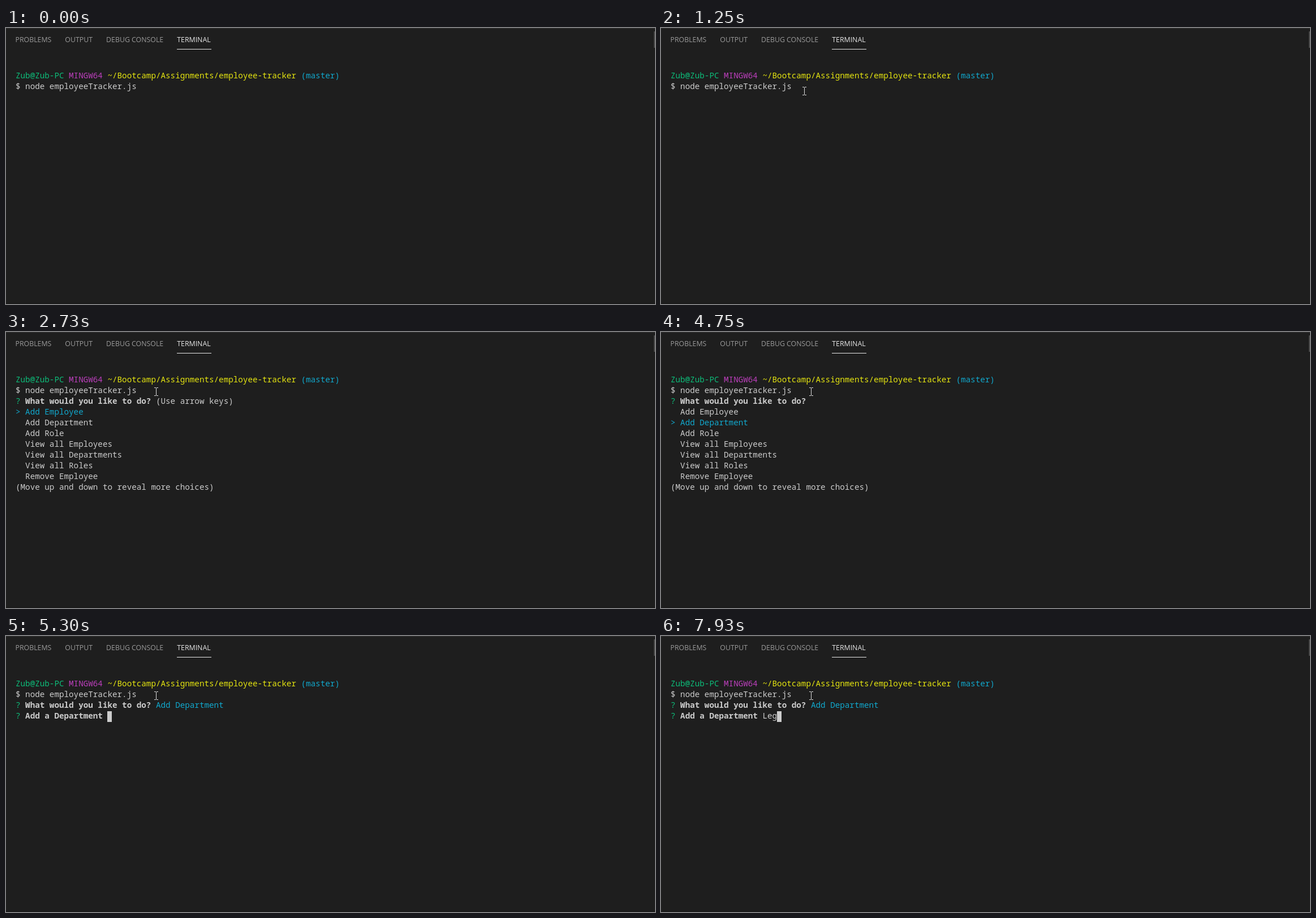
An HTML page with a canvas for the animation above (8000 ms loop, 1147 by 488 pixels).

```html
<!DOCTYPE html>
<html lang="en">
<head>
<meta charset="utf-8">
<title>Employee tracker terminal</title>
<style>
  html, body { margin: 0; width: 100%; height: 100%; overflow: hidden; background: #1e1e1e; }
  canvas { display: block; }
</style>
</head>
<body>
<canvas id="stage" width="1147" height="488"></canvas>
<script>
const ctx = document.getElementById("stage").getContext("2d");
const LOOP = 8000;
const LEFT = 17, BASELINE = 89, ROW = 19, FONT_SIZE = 14.25, COL = FONT_SIZE * 0.6;
const TEXT = "#cccccc", GREEN = "#0dbc79", MAGENTA = "#bc3fbc", YELLOW = "#e5e510", CYAN = "#11a8cd";
const DIM = "#9a9a9a", BRIGHT = "#e7e7e7";

const TABS = ["PROBLEMS", "OUTPUT", "DEBUG CONSOLE", "TERMINAL"];
const CHOICES = ["Add Employee", "Add Department", "Add Role", "View all Employees",
  "View all Departments", "View all Roles", "Remove Employee"];
const ANSWER = "Leg", KEY_TIMES = [7080, 7620, 7930];

// The pointer is sampled every 80 ms while it glides through these moves.
const SAMPLE = 80, SAMPLE_PHASE = 50;
const ENTRY = { time: 70, x: 1011, y: 477 };
const MOVES = [
  { from: 70, to: 450, x: 209, y: 182 },
  { from: 530, to: 770, x: 266, y: 124 },
  { from: 770, to: 1250, x: 253, y: 111 },
  { from: 1330, to: 1410, x: 274, y: 97 },
  { from: 1410, to: 1490, x: 265, y: 105 }
];

const clamp = u => Math.min(1, Math.max(0, u));
const easeOut = u => u * (2 - u);

function rect(x, y, w, h, color) {
  ctx.fillStyle = color;
  ctx.fillRect(x, y, w, h);
}

function write(row, col, text, color = TEXT, weight = 500) {
  ctx.font = `${weight} ${FONT_SIZE}px "Noto Sans Mono", monospace`;
  ctx.fillStyle = color;
  ctx.fillText(text, LEFT + col * COL, BASELINE + row * ROW);
}

function drawPanel() {
  rect(0, 0, 1147, 488, "#1e1e1e");
  rect(0, 0, 1147, 1, "#303030");
  rect(0, 486, 1147, 2, "#1a1a1a");
  rect(1145, 6, 2, 29, "#4b4b4b");
  ctx.font = '12.35px "Open Sans", sans-serif';
  let x = 16.5;
  for (const label of TABS) {
    ctx.fillStyle = label === "TERMINAL" ? BRIGHT : DIM;
    ctx.fillText(label, x, 25);
    x += ctx.measureText(label).width + 24;
  }
  rect(302, 37, 61, 1, BRIGHT);
}

function drawCommand() {
  write(0, 0, "Zub@Zub-PC", GREEN);
  write(0, 11, "MINGW64", MAGENTA);
  write(0, 19, "~/Bootcamp/Assignments/employee-tracker", YELLOW);
  write(0, 59, "(master)", CYAN);
  write(1, 0, "$ node employeeTracker.js");
}

function ask(row, question) {
  write(row, 0, "?", GREEN);
  write(row, 2, question, TEXT, 700);
}

function drawMenu(selected) {
  CHOICES.forEach((choice, i) => {
    const active = i === selected;
    if (active) write(3 + i, 0, ">", CYAN);
    write(3 + i, 2, choice, active ? CYAN : TEXT);
  });
  write(10, 0, "(Move up and down to reveal more choices)");
}

function drawInput(t) {
  const count = KEY_TIMES.filter(time => time <= t).length;
  ask(3, "Add a Department");
  write(3, 19, ANSWER.slice(0, count));
  rect(Math.floor(LEFT + (19 + count) * COL), 133, 8, 19, TEXT);
}

function drawPointer(t) {
  if (t < ENTRY.time) return;
  const sampled = Math.floor((t - SAMPLE_PHASE) / SAMPLE) * SAMPLE + SAMPLE_PHASE;
  let { x, y } = ENTRY;
  for (const move of MOVES) {
    const u = easeOut(clamp((sampled - move.from) / (move.to - move.from)));
    x += (move.x - x) * u;
    y += (move.y - y) * u;
  }
  x = Math.round(x);
  y = Math.round(y);
  for (const end of [y - 7, y + 7]) {
    rect(x - 3, end, 3, 1, "#dddddd");
    rect(x + 1, end, 3, 1, "#dddddd");
  }
  rect(x, y - 6, 1, 13, "#dddddd");
}

function draw(t) {
  drawPanel();
  drawCommand();
  if (t >= 2730) ask(2, "What would you like to do?");
  if (t >= 5220) {
    write(2, 29, "Add Department", CYAN);
    if (t >= 5300) drawInput(t);
  } else if (t >= 4750) {
    drawMenu(1);
  } else if (t >= 2730) {
    write(2, 29, "(Use arrow keys)");
    drawMenu(0);
  }
  drawPointer(t);
}

const start = performance.now();
function tick() {
  draw((performance.now() - start) % LOOP);
  requestAnimationFrame(tick);
}
tick();
</script>
</body>
</html>
```
